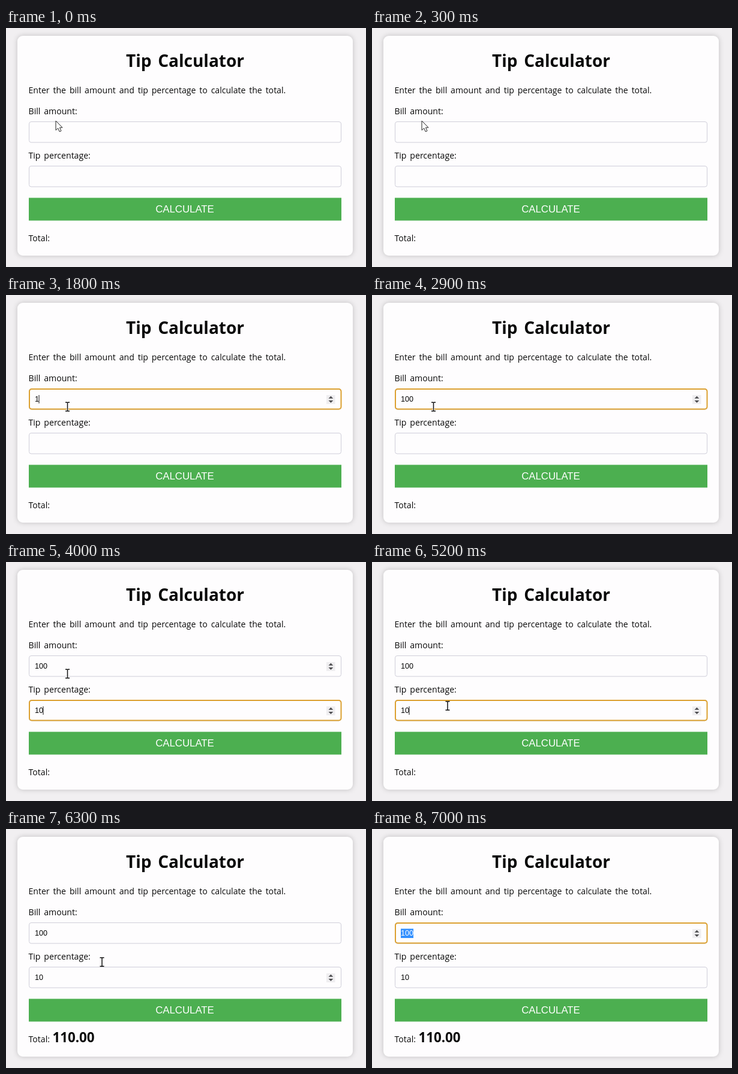
Recreate the animation shown at these times as an HTML page. Size 600 px wide and 399 px high, loop 7.7 s.

```html
<!DOCTYPE html>
<html lang="en">
<head>
<meta charset="utf-8">
<title>Tip Calculator</title>
<style>
  html, body { margin: 0; width: 100%; height: 100%; overflow: hidden; background: #f1eff1; }
  svg { display: block; width: 600px; height: 399px; }
  text { fill: #080808; font: 14.1px "Open Sans", "Noto Sans", sans-serif; word-spacing: 2.2px; }
  .title { font-size: 28px; font-weight: 700; word-spacing: 3.5px; text-anchor: middle; }
  .total { font-size: 22.3px; font-weight: 700; }
  .value { font: 12.6px "Liberation Sans", Arial, sans-serif; }
  .label { font: 16.8px "Liberation Sans", Arial, sans-serif; fill: #fff; text-anchor: middle; }
  .card { fill: #fefdfe; filter: drop-shadow(0 0 4.5px rgba(0, 0, 0, .2)); }
  .box { fill: #fefdfe; stroke: #cfced9; }
  .ring { fill: none; stroke: #dca02f; stroke-width: 2; }
  .solid { fill: #fff; stroke: #222; stroke-linejoin: round; }
</style>
</head>
<body>
<svg viewBox="0 0 600 399">
  <rect class="card" x="19" y="13" width="559" height="367" rx="9"/>
  <text class="title" x="298.5" y="64.5">Tip Calculator</text>
  <text x="37.5" y="109">Enter the bill amount and tip percentage to calculate the total.</text>
  <text x="37.5" y="144">Bill amount:</text>
  <text x="37.5" y="218">Tip percentage:</text>
  <g id="bill" transform="translate(38 156)"></g>
  <g id="tip" transform="translate(38 230)"></g>
  <rect id="button" x="38" y="283.5" width="521" height="38"/>
  <text class="label" x="298" y="308">CALCULATE</text>
  <text x="37.5" y="356">Total:</text>
  <text id="total" class="total" x="77.5" y="356">110.00</text>

  <g id="arrow">
    <path class="solid" d="M0 0V15.6L3.7 12.2L6.2 18L9 16.8L6.5 11.2H11Z"/>
  </g>
  <g id="beam" fill="none">
    <path stroke="#fff" stroke-width="3" d="M0-6V6"/>
    <path stroke="#111" stroke-width="1.5" d="M-3.5-7.3H-1Q0-7.3 0-6.3Q0-7.3 1-7.3H3.5M0-6.5V6.5M-3.5 7.3H-1Q0 7.3 0 6.3Q0 7.3 1 7.3H3.5"/>
  </g>
  <g id="hand">
    <path class="solid" d="M-3.6 2V-8.5Q-3.6-10.3-2-10.3T-.3-8.5V-3.2Q2.6-4.2 2.9-2.3Q5.4-3 5.7-1.1Q8-1.3 8 1V5Q8 7 6.5 9V11.5H-2.6V9.3L-7.4 2.5Q-8.2.8-6.7.2Q-5.4-.2-3.6 2Z"/>
    <path stroke="#222" fill="none" d="M-.3-3.2V1M2.9-2.3V1.4M5.7-1.1V2"/>
  </g>
</svg>
<script>
const LOOP = 7700, DIGIT = 7;
const byId = id => document.getElementById(id);
const show = (node, on) => { node.style.display = on ? '' : 'none'; };

function makeField(id) {
  const root = byId(id);
  root.innerHTML = `
    <rect class="box" x=".5" y=".5" width="520" height="34.5" rx="3.5"/>
    <rect class="ring" x="1" y="1" width="519.5" height="33.5" rx="4"/>
    <rect class="mark" y="10.5" height="15.5" fill="#3390ff"/>
    <text class="value" x="10" y="22"></text>
    <rect class="caret" y="11" width="1" height="14" fill="#111"/>
    <g class="spinner">
      <rect x="496" y="11" width="14.5" height="15" fill="#efeef0"/>
      <path d="M499.5 16.8L503.4 12.8L507.3 16.8ZM499.5 20L503.4 24L507.3 20Z" fill="#4d4d50"/>
    </g>`;
  const part = name => root.querySelector('.' + name);
  const [ring, mark, value, caret, spinner] = ['ring', 'mark', 'value', 'caret', 'spinner'].map(part);
  return (text, focused, caretOn, hovered, selected) => {
    const end = 9.5 + DIGIT * text.length;
    value.textContent = text;
    value.style.fill = selected === 3 ? '#fff' : '';
    show(ring, focused);
    show(caret, focused && caretOn);
    show(spinner, focused || hovered);
    caret.setAttribute('x', end - DIGIT * selected);
    mark.setAttribute('x', end + .5 - DIGIT * selected);
    mark.setAttribute('width', DIGIT * selected);
  };
}

const drawBill = makeField('bill'), drawTip = makeField('tip');
const cursors = ['arrow', 'beam', 'hand'];

// Each step lists only what changes at that time.
const steps = [
  [0, { bill: '', tip: '', focus: '', hover: '', caret: false, selected: 0, total: false, cursor: 'arrow', at: [83, 155] }],
  [600, { cursor: 'beam', at: [97, 177], hover: 'bill' }],
  [700, { at: [102.5, 186.5] }],
  [900, { focus: 'bill', caret: true }],
  [1400, { caret: false }],
  [1800, { bill: '1', caret: true }],
  [2100, { bill: '10' }],
  [2400, { bill: '100' }],
  [2900, { caret: false }],
  [3100, { focus: 'tip', caret: true }],
  [3600, { caret: false }],
  [3900, { tip: '1', caret: true }],
  [4000, { tip: '10' }],
  [4500, { caret: false }],
  [4900, { at: [105, 197], hover: 'tip' }],
  [5000, { at: [109, 207], caret: true }],
  [5200, { at: [126, 240] }],
  [5300, { at: [146, 272] }],
  [5400, { at: [163, 299.5], cursor: 'hand', hover: 'button' }],
  [5500, { focus: '', caret: false }],
  [5700, { total: true }],
  [6200, { at: [161, 257], cursor: 'beam', hover: 'tip' }],
  [6300, { at: [160, 222] }],
  [6400, { at: [128, 196], hover: '' }],
  [6500, { at: [92, 177], hover: 'bill' }],
  [6700, { at: [76, 175], focus: 'bill', caret: true }],
  [6800, { at: [55, 175], selected: 2, caret: false }],
  [6900, { at: [14, 175], selected: 3 }],
  [7000, { cursor: '' }]
];

function draw(time) {
  const s = Object.assign({}, ...steps.filter(step => step[0] <= time).map(step => step[1]));
  drawBill(s.bill, s.focus === 'bill', s.caret, s.hover === 'bill', s.selected);
  drawTip(s.tip, s.focus === 'tip', s.caret, s.hover === 'tip', 0);
  byId('button').setAttribute('fill', s.hover === 'button' ? '#45a049' : '#4caf50');
  show(byId('total'), s.total);
  for (const name of cursors) {
    show(byId(name), name === s.cursor);
    byId(name).setAttribute('transform', `translate(${s.at})`);
  }
}

const start = performance.now();
function tick() {
  draw((performance.now() - start) % LOOP);
  requestAnimationFrame(tick);
}
tick();
</script>
</body>
</html>
```
